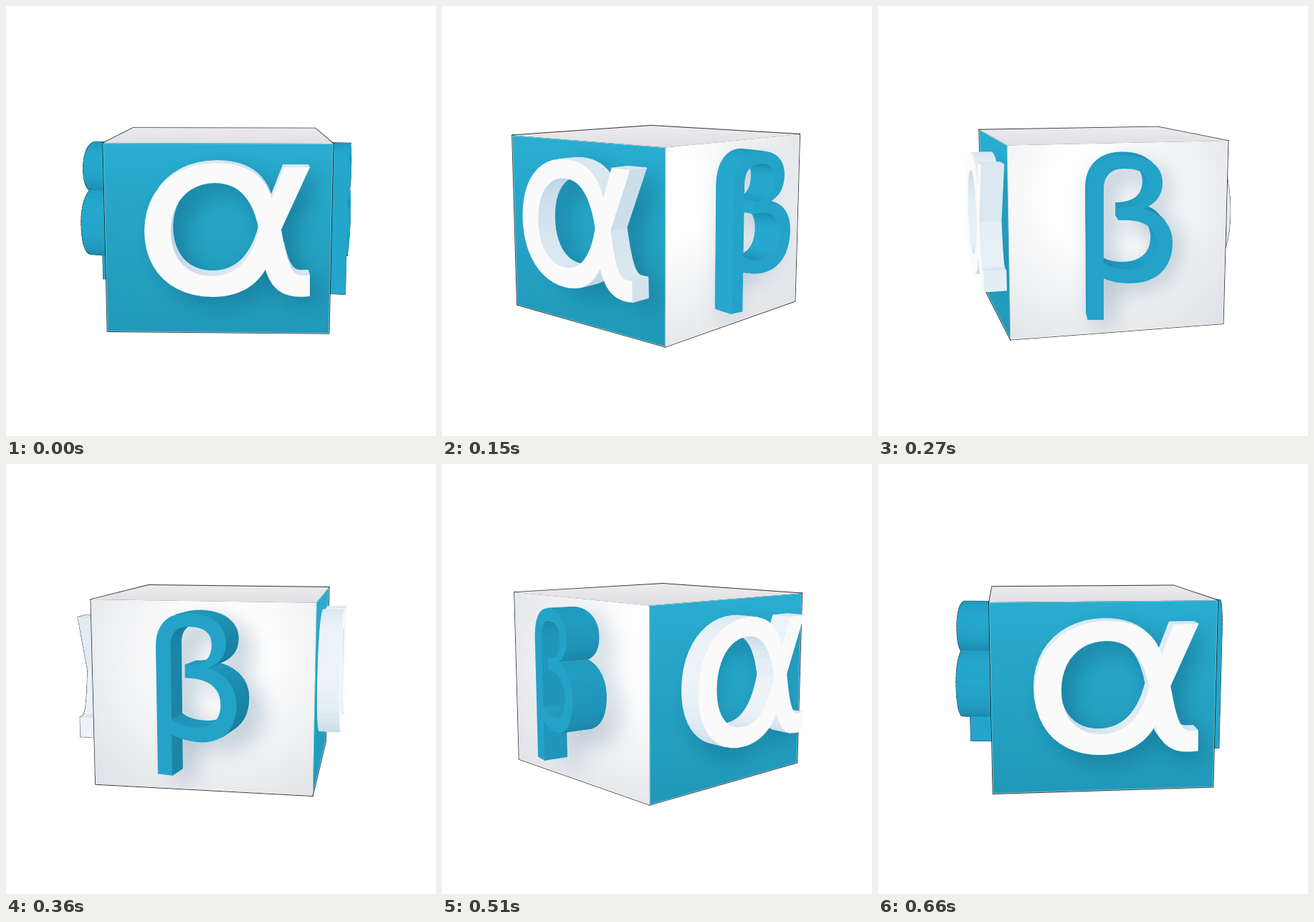
Recreate the animation shown at these times as an HTML page with a canvas. Size 600 px wide and 600 px high, loop 0.69 s.

```html
<!DOCTYPE html>
<html>
<head>
<meta charset="utf-8">
<style>
html, body { margin: 0; width: 100%; height: 100%; overflow: hidden; background: #fff; }
canvas { display: block; }
</style>
</head>
<body>
<canvas id="stage" width="600" height="600"></canvas>
<script>
const ctx = document.getElementById('stage').getContext('2d');
const LOOP = 690, STEP = 30, STEPS = LOOP / STEP;
const CX = 300.2, CY = 299, FOCAL = 1200, DISTANCE = 8.6;
const SIN_P = 0.172, COS_P = 0.985, HALF_H = 0.853;
const LIGHT = [-0.4, 0.4, 0.82];
const RAD = Math.PI / 180;

// Letter fronts as seen on the stage at the pose where each faces the viewer.
const ALPHA = [
  'M424 225 L384 312 C390 345 396 376 412 376 L424 376 L424 405 C390 409 371 398 362 368 ' +
  'C347 393 322 406 288 406 C232 406 193 370 193 314 C193 256 235 219 293 219 ' +
  'C340 219 362 240 371 268 L388 225',
  'M353 313 C345 270 325 247 292 247 C254 247 230 275 230 314 ' +
  'C230 353 253 377 287 377 C322 377 343 352 353 313'
];
const BETA = [
  'M293 438 L292 258 C292 224 314 208 344 208 C378 208 397 224 397 246 ' +
  'C397 264 388 276 370 283 C396 289 411 306 411 330 C411 366 388 387 352 387 ' +
  'C338 387 326 385 315 380 L315 438',
  'M315 358 L315 255 C315 237 325 227 344 227 C366 227 376 234 376 250 ' +
  'C376 270 364 281 336 281 L336 299 C370 297 388 308 388 332 ' +
  'C388 355 372 367 349 367 C334 367 323 364 315 358'
];

const yawAt = step => {
  const t = step / STEPS;
  return 1.7 + 180 * t + 4.5 * Math.sin(Math.PI * (t - 0.03)) ** 2;
};

// A point on the side turned by angle a: u across, y up, r out from the axis.
function project(a, u, y, r) {
  const x = u * Math.cos(a) + r * Math.sin(a);
  const z = r * Math.cos(a) - u * Math.sin(a);
  const depth = y * SIN_P + z * COS_P;
  const k = FOCAL / (DISTANCE - depth);
  return [CX + k * x, CY - k * (y * COS_P - z * SIN_P), depth];
}

function area(pts) {
  return pts.reduce((sum, p, i) => {
    const q = pts[(i + 1) % pts.length];
    return sum + p[0] * q[1] - q[0] * p[1];
  }, 0);
}

function flatten(path) {
  const pts = [];
  for (const [, cmd, args] of path.matchAll(/([MLC])([\d ]+)/g)) {
    const n = args.trim().split(' ').map(Number);
    if (cmd !== 'C') { pts.push(n); continue; }
    const [x0, y0] = pts[pts.length - 1];
    for (let i = 1; i <= 12; i++) {
      const t = i / 12, s = 1 - t;
      const bez = (a, b, c, d) => s * s * s * a + 3 * s * s * t * b + 3 * s * t * t * c + t * t * t * d;
      pts.push([bez(x0, n[0], n[2], n[4]), bez(y0, n[1], n[3], n[5])]);
    }
  }
  return pts;
}

// The front plane leans: its distance from the box grows with u.
function makeGlyph(paths, angle, look) {
  const a = angle * RAD;
  const height = u => look.depth + look.lean * u;
  const toLocal = ([px, py]) => {
    let u = 0, y = 0;
    for (let i = 0; i < 10; i++) {
      const [x, v] = project(a, u, y, 1 + height(u));
      u += (px - x) / 160;
      y -= (py - v) / 160;
    }
    return [u, y];
  };
  // Outer contours run clockwise, holes the other way, so walls face outward.
  const contours = paths.map((path, i) => {
    const pts = flatten(path);
    if ((area(pts) > 0) !== (i === 0)) pts.reverse();
    return pts.map(toLocal);
  });
  return {
    ...look, contours,
    frontPoint: (a, [u, y]) => project(a, u, y, 1 + height(u)),
    basePoint: (a, [u, y]) => project(a, u + look.lean * height(u), y, 1)
  };
}

const alpha = makeGlyph(ALPHA, -yawAt(0), {
  depth: 0.2, lean: 0,
  front: [250, 250, 251], dark: [165, 198, 217], light: [236, 243, 248],
  shadow: 'rgba(10,84,112,0.5)'
});
const beta = makeGlyph(BETA, 90 - yawAt(9), {
  depth: 0.27, lean: 0.17,
  front: [36, 162, 200], dark: [20, 112, 144], light: [38, 168, 206],
  shadow: 'rgba(120,150,175,0.7)'
});

const rgb = c => `rgb(${c.map(Math.round).join()})`;
const mix = (a, b, t) => a.map((v, i) => v + (b[i] - v) * t);

function trace(...polys) {
  ctx.beginPath();
  for (const pts of polys) {
    pts.forEach((p, i) => i ? ctx.lineTo(p[0], p[1]) : ctx.moveTo(p[0], p[1]));
    ctx.closePath();
  }
}

function outline(pts) {
  trace(pts);
  ctx.strokeStyle = 'rgba(0,0,0,0.8)';
  ctx.lineWidth = 1.8;
  ctx.stroke();
}

function drawLetter(glyph, a, outlined) {
  const caps = glyph.contours.map(c => c.map(p => glyph.frontPoint(a, p)));
  const walls = [];
  glyph.contours.forEach((contour, k) => contour.forEach((p, i) => {
    const j = (i + 1) % contour.length, q = contour[j];
    const quad = [caps[k][i], caps[k][j], glyph.basePoint(a, q), glyph.basePoint(a, p)];
    const du = q[0] - p[0], dy = q[1] - p[1], len = Math.hypot(du, dy);
    if (len < 1e-6 || area(quad) >= 0) return;
    const nu = -dy / len, ny = du / len;
    const lit = nu * Math.cos(a) * LIGHT[0] + ny * LIGHT[1] - nu * Math.sin(a) * LIGHT[2];
    walls.push({
      quad,
      z: quad.reduce((sum, v) => sum + v[2], 0),
      color: rgb(mix(glyph.dark, glyph.light, Math.min(1, 0.5 + 0.55 * lit)))
    });
  }));
  walls.sort((p, q) => p.z - q.z);
  if (outlined) walls.forEach(w => outline(w.quad));
  for (const { quad, color } of walls) {
    trace(quad);
    ctx.fillStyle = ctx.strokeStyle = color;
    ctx.lineWidth = 0.9;
    ctx.fill();
    ctx.stroke();
  }
  if (area(caps[0]) > 0) {
    trace(...caps);
    ctx.fillStyle = rgb(glyph.front);
    ctx.fill('evenodd');
  }
}

function gradient(g, from, to) {
  g.addColorStop(0, from);
  g.addColorStop(1, to);
  return g;
}
const tealFill = gradient(ctx.createLinearGradient(0, 185, 0, 465), 'rgb(41,173,209)', 'rgb(32,152,184)');
const whiteFill = gradient(ctx.createRadialGradient(300, 265, 70, 300, 265, 240), 'rgb(254,254,254)', 'rgb(224,227,231)');
const topFill = gradient(ctx.createLinearGradient(0, 168, 0, 198), 'rgb(236,235,238)', 'rgb(222,221,225)');

function drawSide({ glyph, a, corners }) {
  ctx.save();
  trace(corners);
  ctx.fillStyle = glyph === alpha ? tealFill : whiteFill;
  ctx.fill();
  ctx.clip();
  ctx.save();
  ctx.shadowColor = glyph.shadow;
  ctx.shadowBlur = 34;
  ctx.shadowOffsetX = 14;
  ctx.shadowOffsetY = 16;
  trace(...glyph.contours.map(c => c.map(p => glyph.basePoint(a, p))));
  ctx.fillStyle = rgb(glyph.dark);
  ctx.fill('evenodd');
  ctx.restore();
  trace(corners);
  ctx.strokeStyle = 'rgba(255,255,255,0.5)';
  ctx.lineWidth = 1.4;
  ctx.stroke();
  ctx.restore();
}

function draw(step) {
  const angle = i => (i * 90 - yawAt(step)) * RAD;
  const sides = [0, 1, 2, 3].map(i => {
    const a = angle(i);
    const corners = [[-1, 1], [1, 1], [1, -1], [-1, -1]].map(([u, v]) => project(a, u, v * HALF_H, 1));
    return { glyph: i % 2 ? beta : alpha, a, corners, visible: area(corners) > 0 };
  }).sort((p, q) => Math.cos(p.a) - Math.cos(q.a));
  const top = [0, 1, 2, 3].map(i => project(angle(i), 1, HALF_H, 1));
  const shown = sides.filter(s => s.visible);

  ctx.lineJoin = 'round';
  ctx.fillStyle = '#fff';
  ctx.fillRect(0, 0, 600, 600);
  sides.filter(s => !s.visible).forEach(s => drawLetter(s.glyph, s.a, true));
  [top, ...shown.map(s => s.corners)].forEach(outline);
  trace(top);
  ctx.fillStyle = topFill;
  ctx.fill();
  shown.forEach(drawSide);
  shown.forEach(s => drawLetter(s.glyph, s.a, false));
}

function tick() {
  draw(Math.floor(performance.now() % LOOP / STEP));
  requestAnimationFrame(tick);
}
tick();
</script>
</body>
</html>
```
